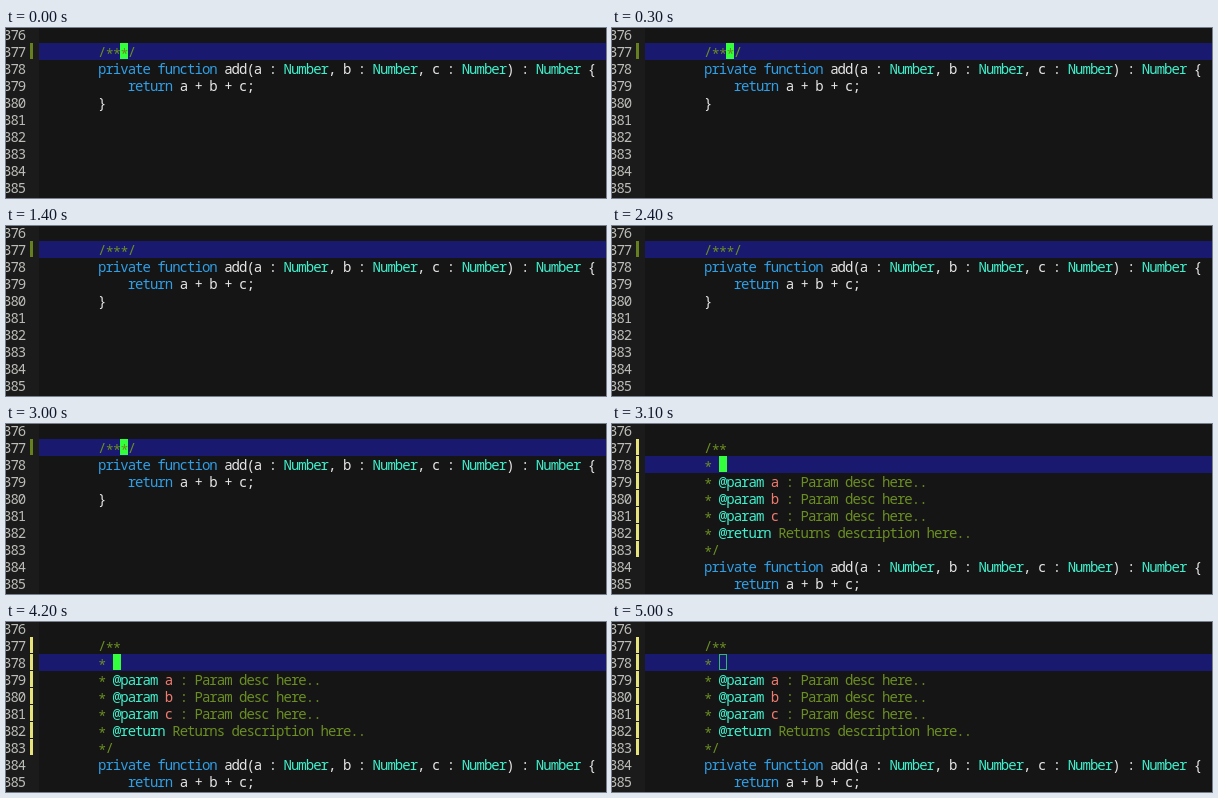
Recreate the animation shown at these times as an HTML page. Size 600 px wide and 170 px high, loop 5200 ms.

```html
<!DOCTYPE html>
<html lang="en">
<head>
<meta charset="utf-8">
<title>Doc comment completion</title>
<style>
  html, body {
    margin: 0;
    width: 100%;
    height: 100%;
    overflow: hidden;
    background: #151515;
  }
  .stage {
    position: relative;
    width: 600px;
    height: 170px;
    overflow: hidden;
    background: #151515;
    color: #e6e6e6;
    font: 14px/17px "Noto Sans Mono", "DejaVu Sans Mono", monospace;
    letter-spacing: -.98px;
    font-variant-ligatures: none;
  }
  .stage div, pre { position: absolute; }
  pre { margin: 0; top: -2px; font: inherit; }
  .view { inset: 0; animation: 5.2s step-end infinite; }
  .before { animation-name: before; }
  .after { animation-name: after; }

  .gutter { left: 0; top: 0; width: 33px; height: 170px; background: #1b1b1b; }
  .numbers { left: -3px; color: #bcbcb8; }
  .code { left: 92px; }
  .line { left: 33px; right: 0; height: 17px; background: #191970; }
  .mark { left: 24px; top: 15px; width: 3px; }
  .before .mark { height: 16px; background: #66801f; }
  .after .mark {
    height: 118px;
    background: repeating-linear-gradient(#e6e27c 0 16px, #1b1b1b 16px 17px);
  }

  .caret { width: 8px; height: 16px; background: #33ff3c; animation: 5.2s step-end infinite; }
  .before .caret { left: 114px; top: 15px; animation-name: blink; }
  .after .caret { left: 107px; top: 32px; animation-name: blink-late; }
  .box { left: 107px; top: 32px; width: 6px; height: 14px; border: 1px solid #35b86c; }

  .key { color: #319fe6; }
  .type { color: #40f0cc; }
  .doc { color: #6b8e23; }
  .arg { color: #f07c70; }
  .star { position: relative; top: 2px; }

  @keyframes before { 0% { visibility: visible } 59.61%, 100% { visibility: hidden } }
  @keyframes after { 0% { visibility: hidden } 59.61%, 100% { visibility: visible } }
  @keyframes blink {
    0%, 17.3%, 36.53%, 55.76% { opacity: 1 }
    7.69%, 26.92%, 46.15%, 100% { opacity: 0 }
  }
  @keyframes blink-late {
    0%, 78.84% { opacity: 1 }
    69.23%, 88.46%, 100% { opacity: 0 }
  }
</style>
</head>
<body>
<div class="stage">
  <div class="gutter"></div>
  <pre class="numbers">376
377
378
379
380
381
382
383
384
385</pre>

  <div class="view before">
    <div class="mark"></div>
    <div class="line" style="top:15px"></div>
    <div class="caret"></div>
    <pre class="code">
&#8203;
<span class="doc">/<span class="star">***</span>/</span>
<span class="key">private function</span> add(a : <span class="type">Number</span>, b : <span class="type">Number</span>, c : <span class="type">Number</span>) : <span class="type">Number</span> {
    <span class="key">return</span> a + b + c;
}</pre>
  </div>

  <div class="view after">
    <div class="mark"></div>
    <div class="line" style="top:32px"></div>
    <div class="box"></div>
    <div class="caret"></div>
    <pre class="code">
&#8203;
<span class="doc">/<span class="star">**</span>
<span class="star">*</span>
<span class="star">*</span> <span class="type">@param</span> <span class="arg">a</span> : Param desc here..
<span class="star">*</span> <span class="type">@param</span> <span class="arg">b</span> : Param desc here..
<span class="star">*</span> <span class="type">@param</span> <span class="arg">c</span> : Param desc here..
<span class="star">*</span> <span class="type">@return</span> Returns description here..
<span class="star">*</span>/</span>
<span class="key">private function</span> add(a : <span class="type">Number</span>, b : <span class="type">Number</span>, c : <span class="type">Number</span>) : <span class="type">Number</span> {
    <span class="key">return</span> a + b + c;</pre>
  </div>
</div>
</body>
</html>
```
